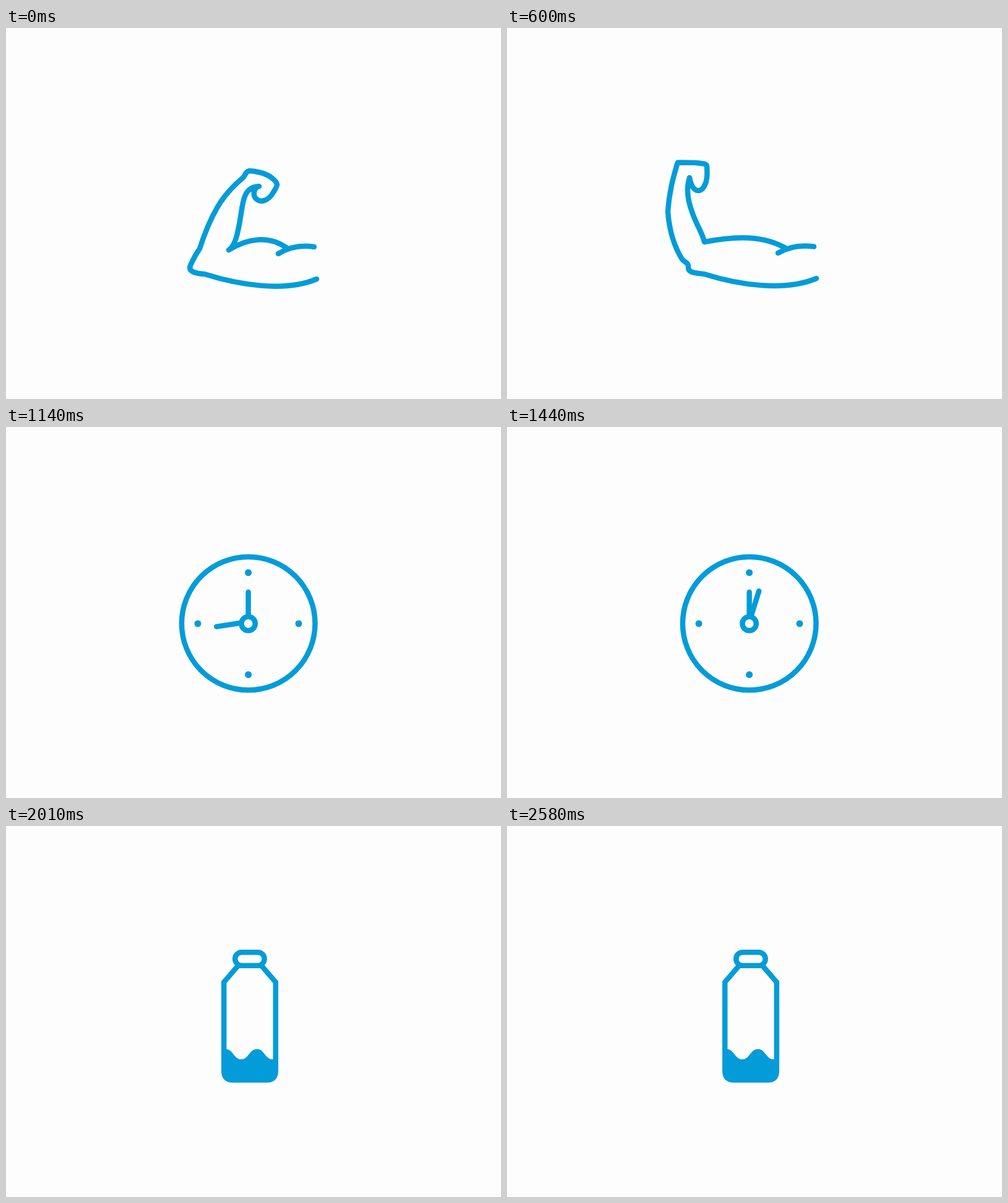
These frames come from a looping animation (800x600 px, 2.76 s). An HTML page:

```html
<!DOCTYPE html>
<html lang="en">
<head>
<meta charset="utf-8">
<title>Arm, clock, bottle</title>
<style>
  html, body { margin: 0; width: 100%; height: 100%; overflow: hidden; background: #fdfdfd; }
  svg { display: block; width: 100vw; height: 100vh; }
  .line { fill: none; stroke: #039cd8; stroke-width: 8.5; stroke-linecap: round; stroke-linejoin: round; }
  .solid { fill: #039cd8; }
</style>
</head>
<body>
<svg viewBox="0 0 800 600">
  <path id="arm" class="line"/>

  <g id="clock" class="line">
    <circle cx="391.7" cy="317.8" r="107.8"/>
    <path d="M391.6 315V267"/>
    <path id="hand" d="M391.6 315V263"/>
    <circle cx="391.6" cy="318" r="11.2" fill="#fdfdfd"/>
    <g class="solid" stroke="none">
      <circle cx="391.6" cy="235.5" r="5.5"/>
      <circle cx="473" cy="318" r="5.5"/>
      <circle cx="391.6" cy="400.5" r="5.5"/>
      <circle cx="310" cy="318" r="5.5"/>
    </g>
  </g>

  <g id="bottle">
    <path id="milk" class="solid"/>
    <path class="line" style="stroke-linejoin:miter;stroke-linecap:butt"
      d="M375 226L352.2 252.5V396Q352.2 410.8 366 410.8H422Q435.8 410.8 435.8 396V252.5L413 226"/>
    <rect class="line" x="370.2" y="204.2" width="47.4" height="21.6" rx="10.8"/>
  </g>
</svg>
<script>
const LOOP = 2760, CLOCK_AT = 930, BOTTLE_AT = 1860;
const $ = id => document.getElementById(id);

// Two poses with the same path commands; the others are blended from them.
const bent = `M360 359 C371 352 375 330 379 306 C383 280 384 257 409 256
  C401 258 398 270 404 276 C412 284 424 278 430 269 C436 260 438 256 438 253
  C437 247 425 237 412 234 C404 232 399 231 393 231 C386 232 387 240 382 243
  C363 259 350 275 341 291 C330 310 321 332 313 357 C308 364 302 375 298 384
  C294 394 306 397 321 398 C375 415 450 428 502 406
  M360 359 C390 340 425 335 454 356 M440 365 C460 353 480 351 498 354`;
const open = `M319 346 C316 332 306 318 300 300 C293 282 289 260 295 242
  C297 254 302 263 309 263 C317 263 322 252 323 242 C324 235 323 227 323 223
  C322 219 314 219 305 218 C296 217.5 286 217.5 276 217.5 C276 217.5 275 220 274.5 222
  C268 244 262 266 260 297 C262 325 270 353 283 374 C288 380 293 379 293 386
  C292 397 306 396 319 398 C373 415 448 427 500 405
  M319 346 C370 336 415 335 452 357 M438 364 C458 352 478 351 496 353.5`;
const openNums = open.match(/[\d.]+/g).map(Number);

// mix: 0 bent, 1 open; lift raises the fist; dx shifts the whole arm
function armPath(mix, lift, dx) {
  let i = 0;
  return bent.replace(/[\d.]+/g, s => {
    const isY = i % 2;
    const v = +s + (openNums[i++] - s) * mix;
    return (isY ? v - lift * Math.max(0, (340 - v) / 120) : v + dx).toFixed(2);
  });
}
const arms = [[0, 0, 0], [0.5, 8, 2.3], [1, 0, 0], [1.2, -3, 1.5]].map(p => armPath(...p));

function milkPath(level, flip) {
  let y = level + (flip ? 8.3 : -8.3), d = `M352 ${y}H355`;
  for (let x = 355; x < 430; x += 25.3) {
    const next = 2 * level - y;
    d += `C${x + 12} ${y} ${x + 13} ${next} ${x + 25.3} ${next}`;
    y = next;
  }
  return d + 'H436V396Q436 411 422 411H366Q352 411 352 396Z';
}
const milks = [[389, 1], [369, 0], [347, 1], [325, 0]].map(p => milkPath(...p));

const pingPong = [0, 1, 2, 3, 2, 1];
const bottleTimes = [0, 150, 300, 450, 570, 720];

function show(id) {
  for (const name of ['arm', 'clock', 'bottle']) $(name).style.display = name === id ? '' : 'none';
}

function draw(t) {
  if (t < CLOCK_AT) {
    show('arm');
    $('arm').setAttribute('d', arms[pingPong[Math.min(5, Math.floor(t / 150))]]);
  } else if (t < BOTTLE_AT) {
    show('clock');
    const step = Math.floor((t - CLOCK_AT) / 30);
    $('hand').setAttribute('transform', `rotate(${180 + step * 360 / 31} 391.6 315)`);
  } else {
    show('bottle');
    const pose = pingPong[bottleTimes.filter(s => s <= t - BOTTLE_AT).length - 1];
    $('milk').setAttribute('d', milks[pose]);
    $('bottle').setAttribute('transform', `translate(${[0.3, 0, 1, 1][pose]} 0)`);
  }
}

const start = performance.now();
function tick() {
  draw((performance.now() - start) % LOOP);
  requestAnimationFrame(tick);
}
tick();
</script>
</body>
</html>
```
